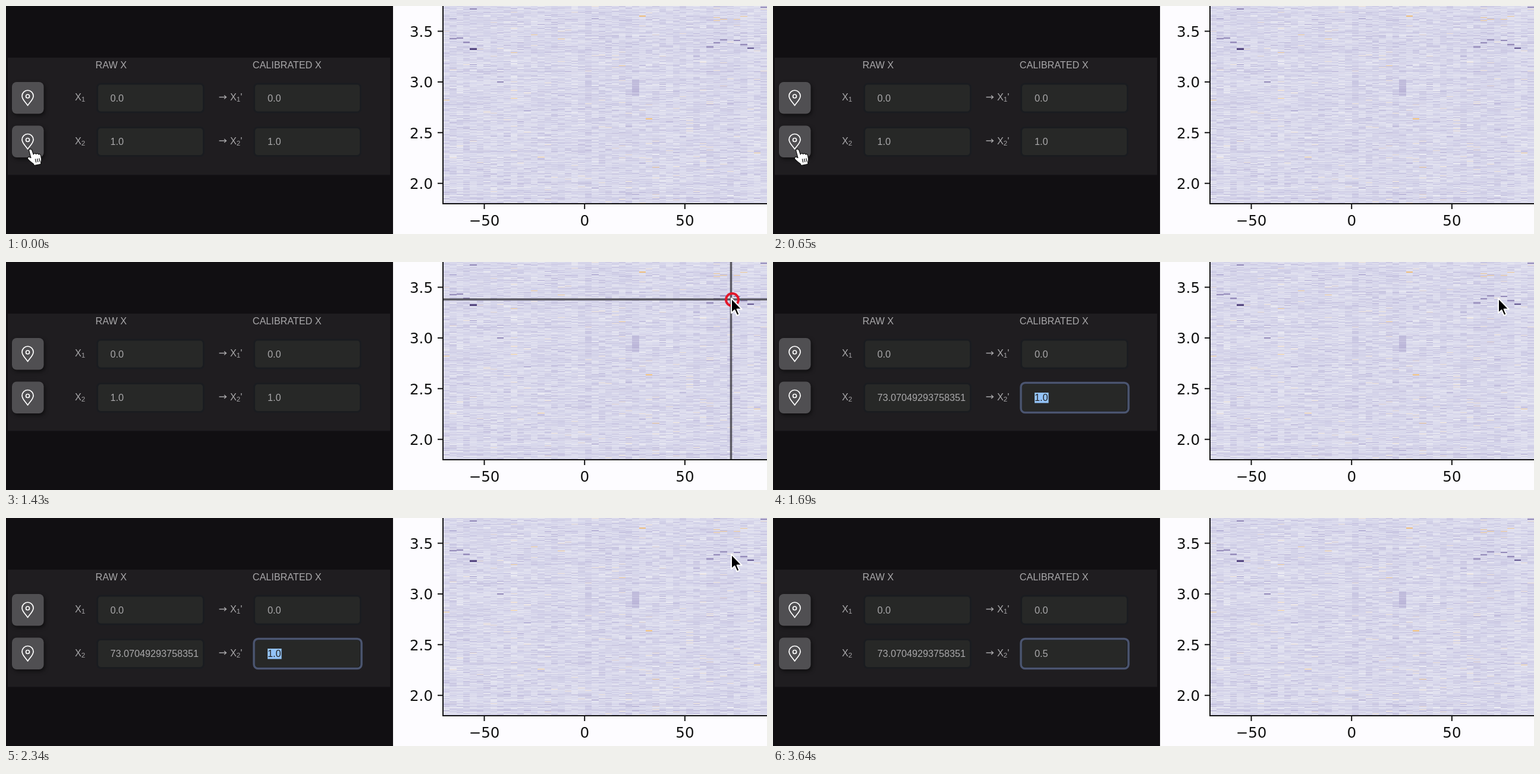
Animation, 1280 px wide and 384 px high, one loop 3770 ms. Source, as an HTML page with a canvas:

```html
<!DOCTYPE html>
<html lang="en">
<head>
<meta charset="utf-8">
<title>Axis calibration</title>
<style>
  html, body { margin: 0; width: 100%; height: 100%; overflow: hidden; background: #110f12; }
  canvas, svg { position: absolute; left: 0; top: 0; }
  text { white-space: pre; }
  .ui { font: 16.2px "Liberation Sans", Arial, sans-serif; fill: #a9a8aa; }
  .sub { font-size: 11.5px; }
  .axis { font: 24.5px "DejaVu Sans", sans-serif; fill: #111; }
  .line { fill: none; stroke: #111; stroke-width: 2; }
  .field { fill: #272827; stroke: #1a1c20; stroke-width: 3; }
  .pin { fill: none; stroke: #fff; stroke-width: 1.7; stroke-linejoin: round; }
  .button { fill: #504f52; filter: drop-shadow(2px 3px 3px #0008); }
</style>
</head>
<body>
<canvas id="heat" width="1280" height="384"></canvas>
<svg width="1280" height="384" viewBox="0 0 1280 384">
  <rect x="3" y="87" width="643" height="197.5" fill="#1f1d20"/>
  <text class="ui" x="150.500" y="105">RAW X</text>
  <text class="ui" x="414.800" y="105">CALIBRATED X</text>
  <g id="rows"></g>
  <rect id="focus" x="417" y="203.5" width="181" height="50" rx="7" fill="none" stroke="#4b5570" stroke-width="3.5"/>
  <rect id="selection" x="440" y="220" width="23.5" height="17.5" fill="#93c3f8"/>
  <text class="ui" id="raw" x="175.5" y="234"></text>
  <text class="ui" id="calibrated" x="440" y="234"></text>
  <rect id="caret" y="220" width="1.6" height="17.5" fill="#eee"/>
  <g id="hand" stroke="#111" stroke-width="1.2" stroke-linejoin="round">
    <path fill="#fff" d="M38.500 243c.4-2.800 4.400-2.800 5.300 0l2.400 7c.6-2.200 3.600-2.400 4.400-.4.8-1.800 3.400-1.600 4 .4 1.600-1.200 3.400-.4 3.800 1.400l1 5c.4 3 0 5-.8 7l.2 3-11.500 2.200-1-2.600c-3-2-6-4.700-9-7.700-2.400-2.600.4-5 2.800-3.600l1.800 1z"/>
    <path fill="none" d="M49.300 257.500l1.400 6M52.500 257l1.400 6M55.700 256.300l1.300 6"/>
  </g>
  <g id="axes"></g>
  <g id="cross">
    <path id="wires" fill="none" stroke="#3c3b42" stroke-opacity=".8" stroke-width="3.5"/>
    <circle id="ring" r="10.500" fill="none" stroke="#e2182b" stroke-width="4"/>
  </g>
  <path id="arrow" fill="#000" stroke="#fff" stroke-width="2" stroke-linejoin="round"
    d="M0 0V25L5.500 20 9.500 29 13.500 27.300 9.700 18.500 17.500 18.200Z"/>
</svg>
<script>
const $ = id => document.getElementById(id);
const show = (id, on) => $(id).setAttribute('visibility', on ? 'visible' : 'hidden');

// Heat map: noisy strips in narrow columns, plus a few distinct streaks
const LEFT = 735, BOTTOM = 332, COL = 11.37;
let seed = 7;
function rand() {
  seed = (seed * 1664525 + 1013904223) % 4294967296;
  return seed / 4294967296;
}
const noise = () => rand() + rand() + rand() - 1.5;
const stops = [[247, 247, 247], [216, 216, 236], [178, 171, 210], [128, 115, 172]];
function shade(v) {
  v = Math.max(0, Math.min(2.99, v));
  const i = Math.floor(v), f = v - i;
  return `rgb(${stops[i].map((c, k) => Math.round(c + (stops[i + 1][k] - c) * f))})`;
}
function drawHeat() {
  const g = $('heat').getContext('2d');
  g.fillStyle = '#fdfcff';
  g.fillRect(651, 0, 629, 384);
  const strip = (col, y, h, color) => {
    const x = Math.round(LEFT + col * COL);
    g.fillStyle = color;
    g.fillRect(x, y, Math.round(LEFT + (col + 1) * COL) - x, h);
  };
  const tint = Array.from({ length: 49 }, () => noise() * 0.07);
  tint[21] += 0.05;
  tint[27] += 0.12;
  for (let y = 0; y < BOTTOM; y++) {
    const band = noise() * (y > 300 ? 0.3 : 0.15);
    for (let col = 0; col < 49; col++) {
      const v = 1 + tint[col] + band + noise() * 0.5;
      strip(col, y, 1, rand() < 0.008 ? '#f1e4d8' : shade(v));
    }
  }
  for (let y = 124; y < 151; y++) strip(28, y, 1, shade(1.6 + noise() * 0.4));
  for (let y = 102; y < 160; y += 2) strip(21, y, 1, shade(1.4 + noise() * 0.4));
  const streaks = (color, h, list) => list.forEach(([col, y]) => strip(col, y, h, color));
  streaks('#9389b8', 2, [[1, 54], [2, 53], [3, 60], [4, 4], [8, 127], [39, 68], [40, 61], [41, 56], [43, 57], [44, 64], [47, 1]]);
  streaks('#a39bca', 1, [[1, 21], [12, 176], [22, 21], [37, 84], [4, 98], [22, 306], [14, 257], [29, 264]]);
  streaks('#54457f', 3, [[4, 71]]);
  streaks('#61548f', 2, [[45, 70]]);
  streaks('#f5c57f', 2, [[29, 16], [30, 189]]);
  streaks('#f3cd96', 1, [[10, 78], [10, 155], [13, 48], [17, 55], [14, 254], [0, 158], [40, 19], [40, 24], [41, 22], [43, 22], [44, 17], [46, 247], [26, 100], [31, 271]]);
}

// Static form rows and axes
const label = (x, y, n, prime) =>
  `<text class="ui" x="${x}" y="${y}">X<tspan class="sub" dy="2">${n}</tspan>` +
  (prime ? `<tspan dy="-2">'</tspan>` : '') + '</text>';
const field = x => `<rect class="field" x="${x}" y="131" width="179" height="48" rx="6"/>`;
const row = (n, dy) => `<g transform="translate(0 ${dy})">
  <rect class="button" x="10" y="128" width="53.5" height="53.5" rx="8"/>
  <path class="pin" d="M36.500 167.500C33 162 27 157.500 27 151.500a9.500 9.500 0 0 1 19 0C46 157.500 40 162 36.500 167.500Z"/>
  <circle class="pin" cx="36.500" cy="152" r="3"/>
  ${label(116, 159, n)}${label(377, 159, n, true)}
  <path d="M358.500 153.500H370.500M367 150.500l3.500 3-3.500 3" fill="none" stroke="#a9a8aa" stroke-width="1.300"/>
  ${field(153.5)}${field(417.5)}</g>`;
$('rows').innerHTML = row(1, 0) + row(2, 73.5) +
  [175.5, 440].map(x => `<text class="ui" x="${x}" y="160.500">0.0</text>`).join('');

const yTick = (text, y) => `<path class="line" d="M726 ${y}h9"/>
  <text class="axis" x="718" y="${y + 9.2}" text-anchor="end">${text}</text>`;
const xTick = (text, x) => `<path class="line" d="M${x} 333v9"/>
  <text class="axis" x="${x}" y="370" text-anchor="middle">${text}</text>`;
$('axes').innerHTML = '<path class="line" d="M735 0V333H1280"/>' +
  ['3.5', '3.0', '2.5', '2.0'].map((s, i) => yTick(s, 42.5 + i * 85.4)).join('') +
  ['−50', '0', '50'].map((s, i) => xTick(s, 804.5 + i * 168.7)).join('');

const LOOP = 3770, STEP = 130;
const AIM = 910, REST = 1430, PICK = 1690, TYPE = 2470, CARET_OFF = 3250;

function draw(now) {
  const t = Math.floor((now % LOOP) / STEP) * STEP;
  const picked = t >= PICK, typing = t >= TYPE;

  // The pointer slows down as it nears the chosen point
  const p = Math.max(0, (REST - t) / 260) ** 3;
  const x = 1219.5 - 8.5 * p, y = 63 + 17 * p;
  show('hand', t < AIM);
  show('cross', t >= AIM && !picked);
  show('arrow', t >= AIM && !typing);
  $('wires').setAttribute('d', `M736 ${y}H1280M${x} 0V332`);
  $('ring').setAttribute('cx', x + 2);
  $('ring').setAttribute('cy', y + 0.5);
  $('arrow').setAttribute('transform', `translate(${x + 0.5} ${y - 2})`);

  const typed = '0.5'.slice(0, (t - TYPE) / STEP + 1);
  $('raw').textContent = picked ? '73.07049293758351' : '1.0';
  $('calibrated').textContent = typing ? typed : '1.0';
  $('calibrated').style.fill = picked && !typing ? '#222' : '';
  show('focus', picked);
  show('selection', picked && !typing);
  show('caret', typing && t < CARET_OFF);
  if (typing) $('caret').setAttribute('x', 440.3 + $('calibrated').getComputedTextLength());
  requestAnimationFrame(draw);
}

drawHeat();
draw(0);
</script>
</body>
</html>
```
